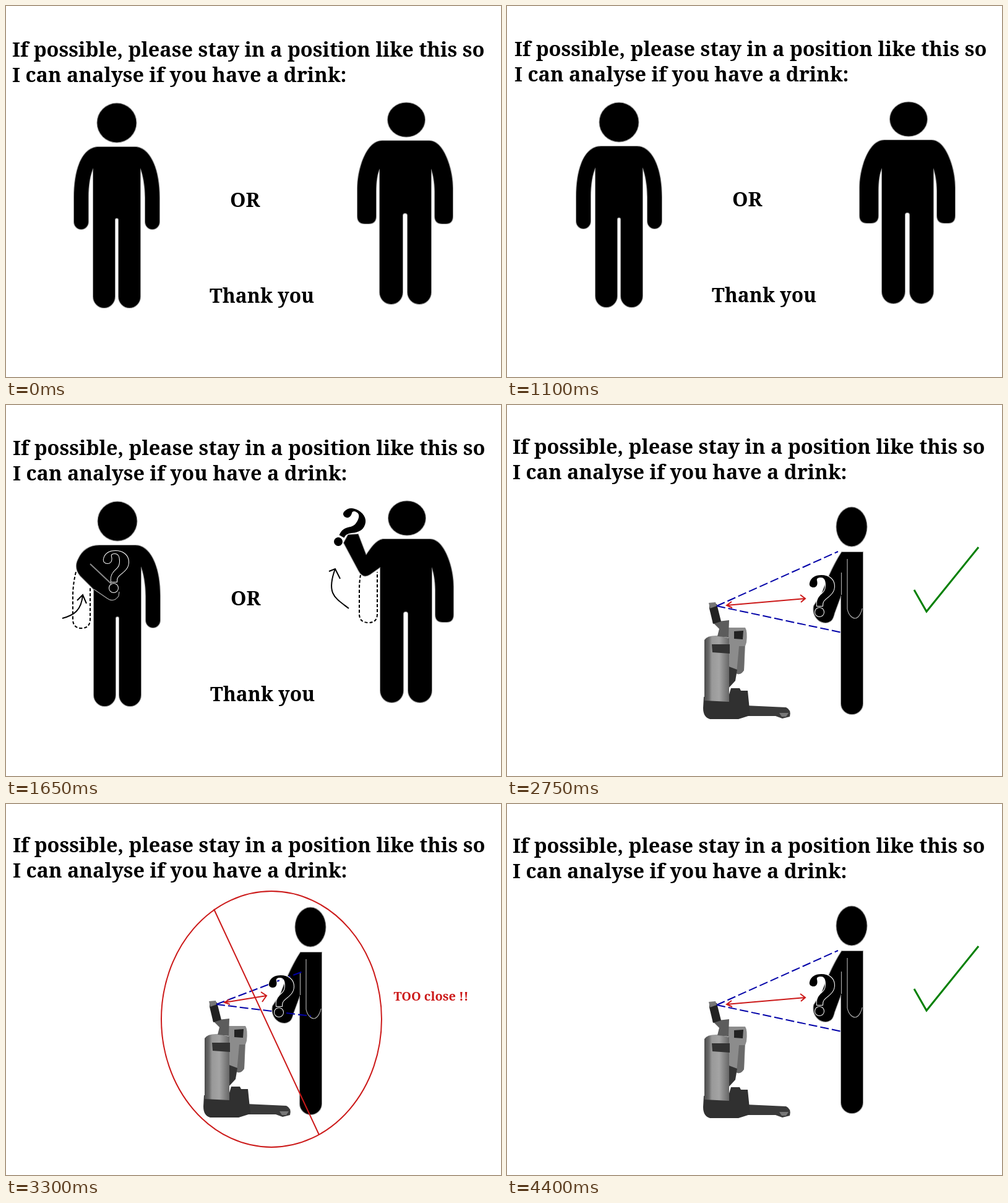
Write an HTML page that moves like this. It is 800x600 px and loops after 4950 ms.

```html
<!DOCTYPE html>
<html lang="en">
<head>
<meta charset="utf-8">
<title>Stay in position</title>
<style>
  html, body { margin: 0; width: 100%; height: 100%; overflow: hidden; background: #fff; }
  svg { display: block; width: 100vw; height: 100vh; }
  text { font: 700 31.7px "Noto Serif", serif; }
  .lead { font-size: 32.45px; }
  .note { font-size: 20px; fill: #cc1a1a; }
  .body { stroke: #999; stroke-width: 2; paint-order: stroke; }
  .line { fill: none; stroke: #000; stroke-width: 2; }
  .dash { stroke-dasharray: 5 3; }
  .seam { fill: none; stroke: #aaa; stroke-width: 1.2; }
  .fold { stroke: #888; stroke-width: 2; }
  .mark { stroke: #fff; stroke-width: 2; paint-order: stroke; }
  .beam { fill: none; stroke: #0000a8; stroke-width: 2; stroke-dasharray: 14 5; }
  .red { fill: none; stroke: #cc1a1a; stroke-width: 2; }
  .tick { fill: none; stroke: #008000; stroke-width: 3; }
  .scene { visibility: hidden; }
</style>
</head>
<body>
<svg viewBox="0 0 800 600">
  <defs>
    <linearGradient id="metal">
      <stop offset="0" stop-color="#4c4c4c"/>
      <stop offset=".18" stop-color="#6a6a6a"/>
      <stop offset=".3" stop-color="#999"/>
      <stop offset=".6" stop-color="#a4a4a4"/>
      <stop offset="1" stop-color="#666"/>
    </linearGradient>
    <g id="question" class="mark">
      <path d="M0 13C2 4 9 0 19 0C31 0 40 7 40 18C40 28 33 33 28 37C22 42 21 44 21 50H12C11 40 14 36 19 31C25 26 26 22 26 16C26 8 23 4 18 4C13 4 11 6 12 9C14 17 10 20 6 20C2 20 -1 17 0 13Z"/>
      <circle cx="16" cy="60" r="7"/>
    </g>
    <g id="heads" class="body">
      <circle cx="179" cy="189" r="31.5"/>
      <ellipse cx="647" cy="184" rx="30" ry="27.5"/>
    </g>
    <g id="person" class="body">
      <ellipse cx="494" cy="202" rx="24.5" ry="31.5"/>
      <path d="M478 243H512V488A17.500 17 0 0 1 477 488V312L466 342C464 350 462 356 452 357C440 357 430 345 433 330L446 310C455 285 468 258 478 243Z"/>
      <path class="seam" d="M487 254V335C489 345 495 350 500 350C506 349 510 340 511 334M477.500 276V312"/>
    </g>
    <g id="robot">
      <path fill="#3a3a3a" d="M390 488L455 491Q464 495 461 506L449 509L438 505L390 505Z"/>
      <path fill="#777" d="M444 500H459L455 506H448Z"/>
      <path fill="#303030" d="M322 474L360 480L366 460H380L382 464H393L397 504L378 510H332Q321 507 321 492Z"/>
      <path fill="#8c8c8c" d="M362 362H389Q393 368 391 386L389 392L387 431Q381 440 374 436L361 430Z"/>
      <path fill="#6a6a6a" d="M379 392H388L387 431Q381 440 375 436Z"/>
      <path fill="#222" d="M371 368L386 367L385 381L371 380Z"/>
      <path fill="#333" d="M360 424L376 430L373 448L361 461Z"/>
      <path fill="url(#metal)" d="M323 382Q328 374 345 375L363 379V482L323 480Z"/>
      <path fill="#333" d="M335 389L364 389V404L336 402Z"/>
      <path fill="#5c5c5c" d="M336 353L363 350L362 378L344 376L347 364Z"/>
      <path fill="#222" d="M331 322L343 324L350 352L337 356L331 331Z"/>
      <path fill="#777" d="M330 322L341 321L343 327L332 331Z"/>
    </g>
  </defs>

  <g id="stage">
    <text class="lead" x="10" y="81.500">If possible, please stay in a position like this so</text>
    <text class="lead" x="10" y="123">I can analyse if you have a drink:</text>

    <g class="scene" data-in="down up">
      <use href="#heads"/>
      <text class="lead" x="362" y="325">OR</text>
      <text x="329" y="479.500">Thank you</text>
    </g>

    <g class="scene body" data-in="down">
      <path d="M150 228H208C232 228 248 262 248 310V349A11.500 12 0 0 1 225 349V310C225 290 221 270 217 262V470A17.500 18 0 0 1 182 470V346A3 3 0 0 0 176 346V470A17.500 18 0 0 1 141 470V262C136 272 133 290 133 310V349A11.500 12 0 0 1 110 349V310C110 262 124 228 150 228Z"/>
      <path d="M608 218H684C708 218 722 265 722 295V340Q722 352 711 352H705Q693 352 693 340V300C693 285 690 270 687 263V463A19 19 0 0 1 649 463V339A4 4 0 0 0 641 339V463A18.500 19 0 0 1 604 463V263C600 270 598 285 598 300V340Q598 352 586 352H580Q568 352 568 340V295C568 265 582 218 608 218Z"/>
    </g>

    <g class="scene" data-in="up">
      <g transform="translate(-1 1)">
        <g class="body">
          <path d="M151 227H209C233 227 249 261 249 309V348A11.500 12 0 0 1 226 348V309C226 289 222 269 218 261V469A17.500 18 0 0 1 183 469V345A3 3 0 0 0 177 345V469A17.500 18 0 0 1 142 469V298L120 276C113 268 112 258 117 249C123 236 134 227 151 227Z"/>
          <path d="M609 217H685C709 217 723 264 723 294V339Q723 351 712 351H706Q694 351 694 339V299C694 284 691 269 688 262V462A19 19 0 0 1 650 462V338A4 4 0 0 0 642 338V462A18.500 19 0 0 1 605 462V262L588 274Q577 281 570 268L546 223L553 210L569 209L582 243C590 231 598 219 609 217Z"/>
        </g>
        <path class="seam fold" d="M136 257L170 289"/>
        <path class="seam" d="M142 298L164 313Q174 320 182 309L183 302"/>
        <path class="line dash" d="M113 270Q108 290 108 310V346Q108 361 122 361Q136 361 136 346V296"/>
        <path class="line dash" d="M573 275Q571 285 571 300V338Q571 352 586 352Q600 352 600 338V270"/>
        <path class="line" d="M91 345C110 340 122 332 124 307M115 316L124 307L130 321"/>
        <path class="line" d="M554 329C532 312 517 306 532 265M522 269L532 265L540 281"/>
        <use href="#question" x="158" y="236"/>
        <use href="#question" transform="translate(537 221) rotate(30) translate(-16 -60)"/>
      </g>
    </g>

    <g transform="translate(-3 1)">
      <use class="scene" data-in="close far" href="#robot"/>
      <g class="scene" data-in="close">
        <use href="#person"/>
        <path class="beam" d="M342 327L484 273M342 327L495 346"/>
        <use href="#question" x="427" y="280"/>
        <path class="red" d="M355 324L423 313M414 307L423 313L416 323M363 319L355 324L364 327"/>
        <ellipse class="red" cx="431" cy="351" rx="178" ry="207"/>
        <path class="red" d="M338 173L508 538"/>
        <text class="note" x="628.500" y="320.500">TOO close !!</text>
      </g>
      <g class="scene" data-in="far">
        <use href="#person" x="67" y="-3"/>
        <path class="beam" d="M343 327L539 239M343 327L545 370"/>
        <use href="#question" x="493" y="277"/>
        <path class="red" d="M359 326L486 315M478 309L486 315L479 321M367 320L359 326L368 330"/>
        <path class="tick" d="M662 301L682 336L766 232"/>
      </g>
    </g>
  </g>
</svg>
<script>
  const STEP = 550;
  // pose, x shift, y shift
  const steps = [
    ["down", 0, 0], ["up", 1, -1], ["down", 2, -1], ["up", 1, -1],
    ["close", 3, -1], ["far", -1, -3], ["close", 1, -4], ["far", -1, -3], ["far", -1, -3]
  ];
  const stage = document.getElementById("stage");
  const scenes = [...document.querySelectorAll(".scene")];
  const start = performance.now();
  let shown = -1;

  function draw(now) {
    const index = Math.floor(Math.max(0, now - start) / STEP) % steps.length;
    if (index !== shown) {
      const [pose, dx, dy] = steps[index];
      stage.setAttribute("transform", `translate(${dx} ${dy})`);
      for (const scene of scenes) {
        const on = scene.dataset.in.split(" ").includes(pose);
        scene.style.visibility = on ? "visible" : "hidden";
      }
      shown = index;
    }
    requestAnimationFrame(draw);
  }
  draw(start);
</script>
</body>
</html>
```
